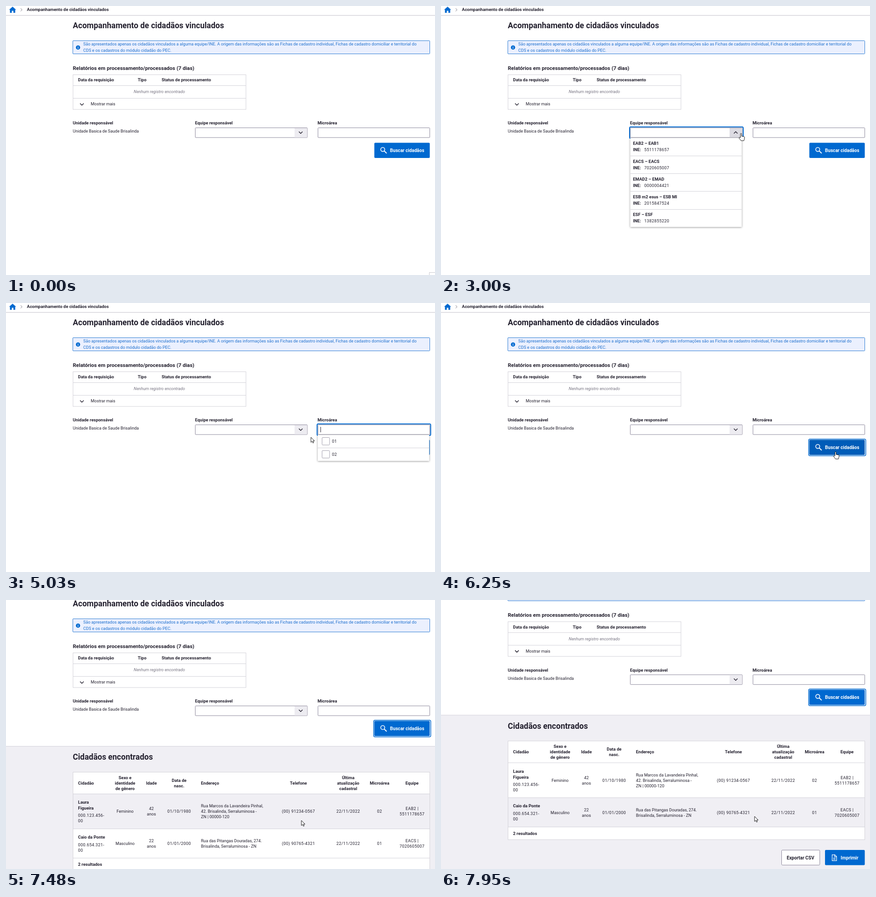
Animation, 944 px wide and 593 px high, one loop 8 s. Source, as an HTML page:

```html
<!DOCTYPE html>
<html lang="pt-BR">
<head>
<meta charset="utf-8">
<style>
  html, body { margin: 0; width: 100%; height: 100%; overflow: hidden; background: #fff; }
  svg { display: block; }
  text { font-family: Roboto, "Liberation Sans", sans-serif; fill: #24212f; white-space: pre; }
  .b { font-weight: 700; }
  .i { font-style: italic; fill: #777482; }
  .m { text-anchor: middle; }
  .n { letter-spacing: .36px; }
  .info { fill: #1d6fce; }
  .w { fill: #fff; }
  .box { fill: #fff; stroke: #d3d2d9; }
  .rule { stroke: #d3d2d9; }
  .field { fill: #fff; stroke: #8b879b; }
  .ring { fill: none; stroke: #0069d0; stroke-width: 2; }
  .line { fill: none; stroke: #24212f; stroke-width: 1.5; }
  .white { fill: none; stroke: #fff; stroke-width: 1.6; }
  .menu { filter: drop-shadow(0 1px 2px rgba(0, 0, 0, .4)); }
  #cursor path { fill: #fff; stroke: #000; stroke-width: .9; stroke-linejoin: round; }
</style>
</head>
<body>
<svg id="stage" width="944" height="593"></svg>
<script>
const BLUE = '#0069d0', GREY = '#f0eff4';

// y is the middle of the text block
function text(x, y, str, cls = '', size = /\bb\b/.test(cls) ? 9.48 : 9.13, lead = 12) {
  return str.split('\n').map((line, i, all) => {
    const base = y + size * .36 + (i - (all.length - 1) / 2) * lead;
    return `<text x="${x}" y="${base}" class="${cls}" font-size="${size}">${line}</text>`;
  }).join('');
}
const rect = (x, y, x2, y2, attrs) =>
  `<rect x="${x}" y="${y}" width="${x2 - x}" height="${y2 - y}" ${attrs}/>`;
const path = (d, attrs) => `<path d="${d}" ${attrs}/>`;
const rule = (x, x2, y) => path(`M${x} ${y}H${x2}`, 'class="rule"');

function header() {
  return rect(0, 20, 944, 21, 'fill="#cfced4"') + rect(0, 21, 944, 22, 'fill="#f1f0f3"')
    + path('M14.5 1.5 6.8 8.2h1.9V15h4v-4.6h3.6V15h4V8.2h1.9z', `fill="${BLUE}"`)
    + path('M32.3 5.2l3 3.2-3 3.2', 'fill="none" stroke="#777482"')
    + text(46, 8, 'Acompanhamento de cidadãos vinculados', 'b')
    + text(147, 43, 'Acompanhamento de cidadãos vinculados', 'b', 17.5)
    + rect(147, 76.5, 932.5, 105.5, 'rx="1" fill="#ebf0fe" stroke="#2b7bd3"')
    + `<circle cx="158.5" cy="91.5" r="4.7" fill="${BLUE}"/>`
    + path('M158.5 88.6v1.2m0 1v3.4', 'stroke="#fff" stroke-width="1.2"')
    + text(170, 91, 'São apresentados apenas os cidadãos vinculados a alguma equipe/INE. A origem das informações são as Fichas de cadastro individual, Fichas de cadastro domiciliar e territorial do\nCDS e os cadastros do módulo cidadão do PEC.', 'info', 9.13, 13.6);
}

function reports() {
  return text(147, 137, 'Relatórios em processamento/processados (7 dias)', 'b', 11.53)
    + rect(147.5, 151.5, 528, 228, 'class="box"')
    + rule(147, 528, 175.5) + rule(147, 528, 203.5)
    + text(158.5, 163, 'Data da requisição', 'b') + text(290, 163, 'Tipo', 'b')
    + text(342.5, 163, 'Status de processamento', 'b')
    + text(337.5, 189, 'Nenhum registro encontrado', 'i m')
    + path('M163 214.8l4 4 4-4', 'class="line"') + text(186.5, 216, 'Mostrar mais');
}

function filters() {
  return text(147, 258, 'Unidade responsável', 'b')
    + text(147, 276, 'Unidade Basica de Saude Brisalinda')
    + text(416, 258, 'Equipe responsável', 'b') + text(685.5, 258, 'Microárea', 'b')
    + rect(416.5, 268.5, 663, 290, 'id="team" class="field" rx="1"')
    + rect(635, 269, 662.5, 289.5, 'id="toggle"')
    + path('M644.5 277l4 4 4-4', 'id="chevron" class="line"')
    + rect(415, 266.5, 665, 292, 'id="teamRing" class="ring" rx="2.5"')
    + rect(686.5, 268.5, 932.5, 290, 'id="area" class="field" rx="1"')
    + rect(684.5, 266.5, 934.5, 292, 'id="areaRing" class="ring" rx="2.5"')
    + rect(692, 273, 693, 285, 'id="caret" fill="#24212f"')
    + rect(810.5, 301.5, 932.5, 335, 'id="search" rx="2"')
    + rect(809, 300, 934.7, 336.8, 'id="searchRing" class="ring" rx="3" style="stroke-width:1.5"')
    + '<circle cx="829" cy="316.2" r="4.4" class="white"/>'
    + path('M832.2 319.4l5.4 5.4', 'class="white" style="stroke-width:2"')
    + text(845, 318.5, 'Buscar cidadãos', 'b w', 10.15);
}

function teamMenu() {
  const teams = [['EAB2 – EAB1', '5511178657'], ['EACS – EACS', '7020605007'],
    ['EMAD2 – EMAD', '0000004421'], ['ESB m2 esus – ESB MI', '2015847524'], ['ESF – ESF', '1382855220']];
  return rect(416.5, 291, 661.7, 487, 'class="menu" fill="#fff" rx="1"') + teams.map(([name, ine], i) => {
    const y = 303 + i * 39.25;
    return (i ? rule(416.5, 661.7, Math.floor(y - 12) + .5) : '')
      + text(422.5, y, name, 'b') + text(422.5, y + 14, 'INE:', 'b') + text(447.3, y + 14, ine, 'n');
  }).join('');
}

function areaMenu() {
  return rect(686, 291, 931.3, 348, 'class="menu" fill="#fff" rx="1"') + rule(686, 931.3, 319.5)
    + ['01', '02'].map((name, i) => rect(695.5, 296.5 + i * 28.8, 712, 313 + i * 28.8,
      'rx="1.5" fill="#fff" stroke="#a19eac"') + text(717.3, 304.8 + i * 28.8, name, 'n')).join('');
}

function person(y, nameY, idY, name, id, sex, age, birth, address, phone, area, team) {
  return text(158.5, nameY, name, 'b', 9.48, 13) + text(158.5, idY, id, 'n')
    + text(262, y, sex, 'm') + text(320, y, age, 'm') + text(381, y, birth, 'm n')
    + text(429, y, address) + text(643.5, y, phone, 'm n')
    + text(753, y, '22/11/2022', 'm n') + text(822, y, area, 'm n') + text(893.5, y, team, 'm n');
}

function results() {
  const heads = [[262, 'Sexo e\nidentidade\nde gênero'], [320, 'Idade'], [381, 'Data de\nnasc.'],
    [643.5, 'Telefone'], [753, 'Última\natualização\ncadastral'], [822, 'Microárea'], [893.5, 'Equipe']];
  return rect(0, 357.5, 944, 720, `fill="${GREY}"`) + rule(0, 944, 357.5)
    + text(147, 381, 'Cidadãos encontrados', 'b', 17.5)
    + rect(147.5, 414.5, 932.5, 632, 'class="box"')
    + rect(148, 462, 932, 539.5, 'id="row1"') + rect(148, 539.5, 932, 604, 'id="row2"')
    + [462.5, 539.5, 604].map(y => rule(147, 933, y)).join('')
    + text(158.5, 438.5, 'Cidadão', 'b') + text(429, 438.5, 'Endereço', 'b')
    + heads.map(([x, s]) => text(x, 438.5, s, 'b m')).join('')
    + person(501, 487.3, 516, 'Laura\nFigueira', '000.123.456-\n00', 'Feminino', '42\nanos', '01/10/1980',
      'Rua Marcos da Lavandeira Pinhal,\n42. Brisalinda, Serraluminosa -\nZN | 00000-120',
      '(00) 91234-0567', '02', 'EAB2 |\n5511178657')
    + person(572, 557.7, 580.6, 'Caio da Ponte', '000.654.321-\n00', 'Masculino', '22\nanos', '01/01/2000',
      'Rua das Pitangas Douradas, 274.\nBrisalinda, Serraluminosa - ZN',
      '(00) 90765-4321', '01', 'EACS |\n7020605007')
    + text(158.5, 618, '2 resultados', 'b')
    + rect(749.5, 655, 833.5, 688, 'rx="2" fill="#fff" stroke="#8b879b"')
    + text(791, 671.6, 'Exportar CSV', 'b m', 10.1)
    + rect(845, 654.6, 932.5, 688.2, `rx="2" fill="${BLUE}"`)
    + path('M860.7 665.3h5.8l4 4v9h-9.8zM866 665.5v4.3h4.3M863 672.8h5.2M863 675.5h5.2', 'class="white" style="stroke-width:1.2"')
    + text(879.5, 671.6, 'Imprimir', 'b w', 10.15);
}

const group = (id, content) => `<g id="${id}">${content}</g>`;
document.getElementById('stage').innerHTML =
  group('page', header() + reports() + filters() + group('results', results())
    + group('teamMenu', teamMenu()) + group('areaMenu', areaMenu()))
  + rect(931.5, 587.5, 950, 600, 'id="corner" fill="#fff" stroke="#c9c8ce"')
  + group('cursor', path('M0 0V11.2L2.6 8.8 4.4 12.7 6.2 11.9 4.5 8.1H8Z', 'id="arrow"')
    + path('M-1 9V1.2a1.3 1.3 0 0 1 2.6 0V6l5 .9q1.6.4 1.4 2.2l-.7 4.2-.8 2.6H.2L-4 10.4q-.6-1.6 1-1.6z', 'id="hand"')
    + path('M-2-6h4M0-6V6M-2 6h4', 'id="beam"'));

const el = {};
document.querySelectorAll('[id]').forEach(e => el[e.id] = e);

// [time, x, y]
const MOVES = [
  [0, 950, 600], [70, 950, 600], [300, 880, 520], [550, 760, 430], [870, 665, 372],
  [1000, 672, 368], [1200, 738, 352], [1350, 756, 325], [1500, 742, 310], [1630, 730, 317],
  [1740, 730, 317], [2000, 690, 295], [2170, 650, 279], [2320, 650, 279], [2650, 660, 281],
  [3050, 660, 281], [3250, 670, 282], [3550, 705, 281], [4560, 705, 281], [4620, 698, 280],
  [4760, 696, 281], [5030, 671, 296], [5250, 642, 310], [5400, 645, 314], [5570, 690, 322],
  [5980, 868, 328], [6600, 868, 328], [6950, 780, 400], [7200, 655, 482], [7280, 650, 486],
  [7650, 650, 486], [7930, 690, 477]
];
const SCROLL = [[7390, 0], [7480, 34.4], [7560, 85], [7650, 103.7]];

function along(keys, t) {
  const i = keys.findIndex(k => k[0] > t);
  if (i < 0) return keys[keys.length - 1].slice(1);
  if (i === 0) return keys[0].slice(1);
  const a = keys[i - 1], b = keys[i], f = (t - a[0]) / (b[0] - a[0]);
  return a.slice(1).map((v, j) => v + (b[j + 1] - v) * f);
}
const between = (t, a, b) => t >= a && t < b;
const fade = (t, open, opened, close, closed) =>
  Math.max(0, Math.min(1, (t - open) / (opened - open), (closed - t) / (closed - close)));
const show = (e, on) => e.style.opacity = +on;

function draw(t) {
  const [x, y] = along(MOVES, t), [scroll] = along(SCROLL, t);
  const py = y + scroll;
  const over = (x1, y1, x2, y2) => between(x, x1, x2) && between(py, y1, y2);
  const found = t >= 6390;
  const onToggle = over(635, 268, 664, 290), onArea = over(686, 268, 933, 290);
  const onSearch = over(810, 301, 933, 335) && t > 5500;
  const teamOpen = between(t, 2390, 3060);

  el.page.setAttribute('transform', `translate(0 ${-scroll})`);
  show(el.corner, t < 70);
  show(el.teamMenu, fade(t, 2390, 2600, 3060, 3260));
  show(el.teamRing, between(t, 2320, 3300));
  el.toggle.style.fill = onToggle || teamOpen ? '#dcdbe2' : '#edecf1';
  el.chevron.setAttribute('d', teamOpen ? 'M644.5 281l4-4 4 4' : 'M644.5 277l4 4 4-4');
  show(el.areaMenu, fade(t, 3700, 3880, 5300, 5480));
  show(el.areaRing, between(t, 3700, 5320));
  show(el.caret, between(t, 3700, 4210) || between(t, 4740, 5270));
  el.area.style.stroke = onArea && t < 4600 ? '#625e73' : '';
  el.search.style.fill = onSearch ? '#005cb8' : BLUE;
  show(el.searchRing, t >= 6250);
  show(el.results, found);
  el.row1.style.fill = found && over(147, 462, 933, 539.5) ? GREY : '#fff';
  el.row2.style.fill = found && over(147, 539.5, 933, 604) ? GREY : '#fff';

  el.cursor.setAttribute('transform', `translate(${Math.round(x)} ${Math.round(y)})`);
  show(el.hand, onToggle || onSearch);
  show(el.beam, onArea);
  show(el.arrow, !(onToggle || onSearch || onArea));
}

function tick() {
  draw(performance.now() % 8000);
  requestAnimationFrame(tick);
}
tick();
</script>
</body>
</html>
```
